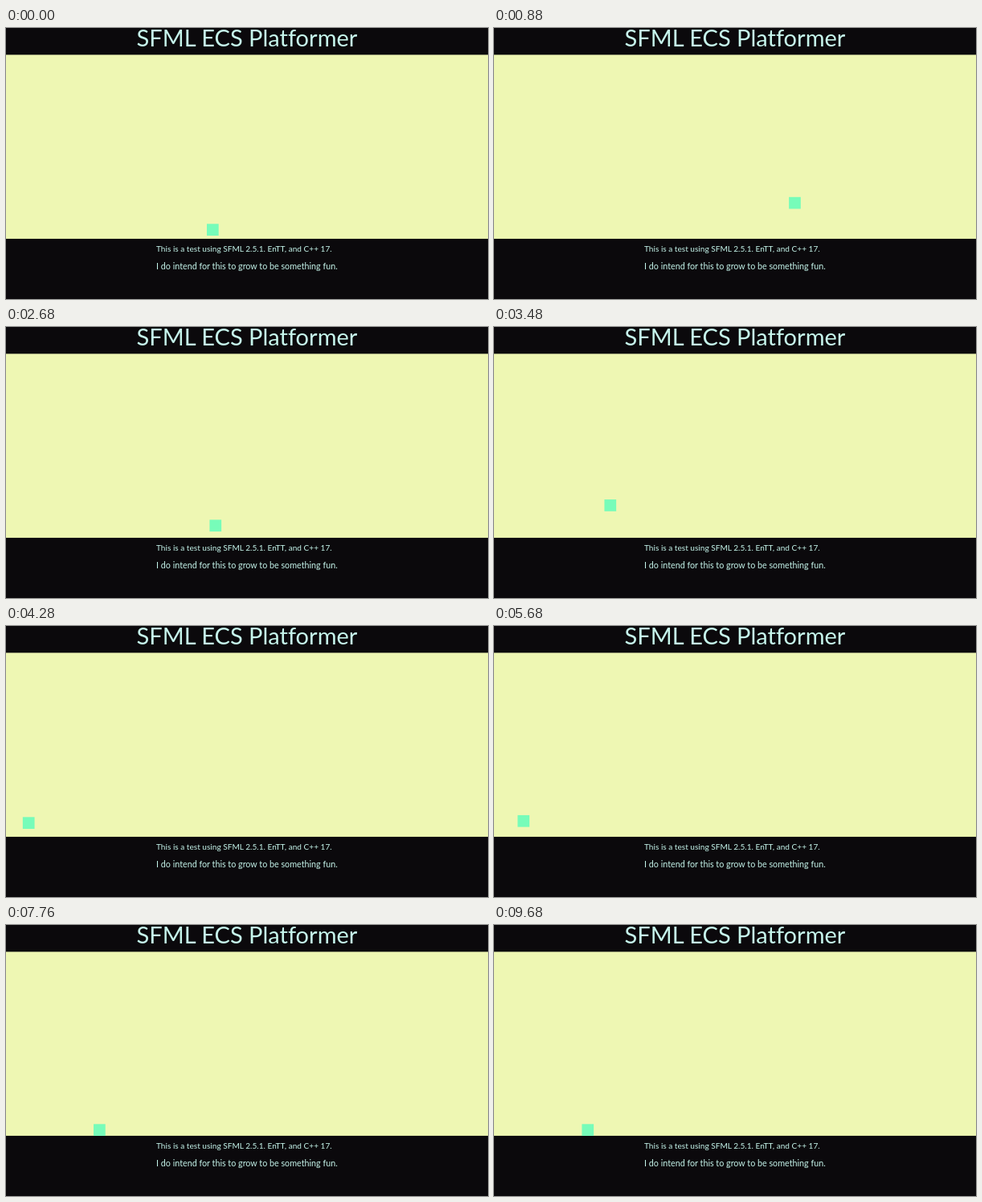
An HTML page for the animation above (9.96 s loop, 600 by 338 pixels).

```html
<!DOCTYPE html>
<html lang="en">
<head>
<meta charset="utf-8">
<title>SFML ECS Platformer</title>
<style>
  html, body { margin: 0; width: 100%; height: 100%; overflow: hidden; background: #0b090c; }
  svg { display: block; width: 600px; height: 338px; }
  text {
    font-family: Lato, "Open Sans", sans-serif;
    font-size: 11px;
    font-variant-ligatures: none;
    fill: #c6f6ec;
  }
</style>
</head>
<body>
<svg viewBox="0 0 600 338">
  <rect width="600" height="338" fill="#0b090c"/>
  <rect y="33.4" width="600" height="229.5" fill="#eef7b3"/>
  <rect id="player" width="14.7" height="14.7" fill="#77fcb9"/>
  <text x="162.6" y="22.8" data-width="275">SFML ECS Platformer</text>
  <text x="187" y="278.8" data-width="219">This is a test using SFML 2.5.1. EnTT, and C++ 17.</text>
  <text x="187" y="300.7" data-width="226">I do intend for this to grow to be something fun.</text>
</svg>
<script>
const LOOP = 9.96, STEP = 0.004, GROUND = 248.3;
const SPEED = 145, PUSH = 405, DRAG = 2.58, GRAVITY = 165, LEAP = 105;
const jumpTimes = [1.495, 2.86, 4.183, 5.554];
const player = document.getElementById('player');

// Held key: right, left, right, then none
const keyAt = t => t < 1.032 ? 1 : t < 5.3 ? -1 : t < 5.85 ? 1 : 0;

// Run the player's physics from the loop start up to time t
function simulate(t) {
  let x = 250, vx = 52, height = 4, vy = 111;
  for (let now = 0; now < t; now += STEP) {
    const key = keyAt(now);
    vx += (key ? key * PUSH : -DRAG * vx) * STEP;
    vx = Math.max(-SPEED, Math.min(SPEED, vx));
    x += vx * STEP;
    if (x < 0) x = vx = 0;

    if (jumpTimes.some(j => j >= now && j < now + STEP)) vy = LEAP;
    vy -= GRAVITY * STEP;
    height += vy * STEP;
    if (height < 0) height = vy = 0;
  }
  return { x, y: GROUND - height };
}

// Pick the font size that gives each line its width
for (const el of document.querySelectorAll('text')) {
  el.style.fontSize = 11 * el.dataset.width / el.getComputedTextLength() + 'px';
}

const begin = performance.now();
function draw() {
  const ms = (performance.now() - begin) % (LOOP * 1000);
  const { x, y } = simulate(Math.floor(ms / 40) * 0.04);
  player.setAttribute('x', x.toFixed(2));
  player.setAttribute('y', y.toFixed(2));
  requestAnimationFrame(draw);
}
draw();
</script>
</body>
</html>
```
